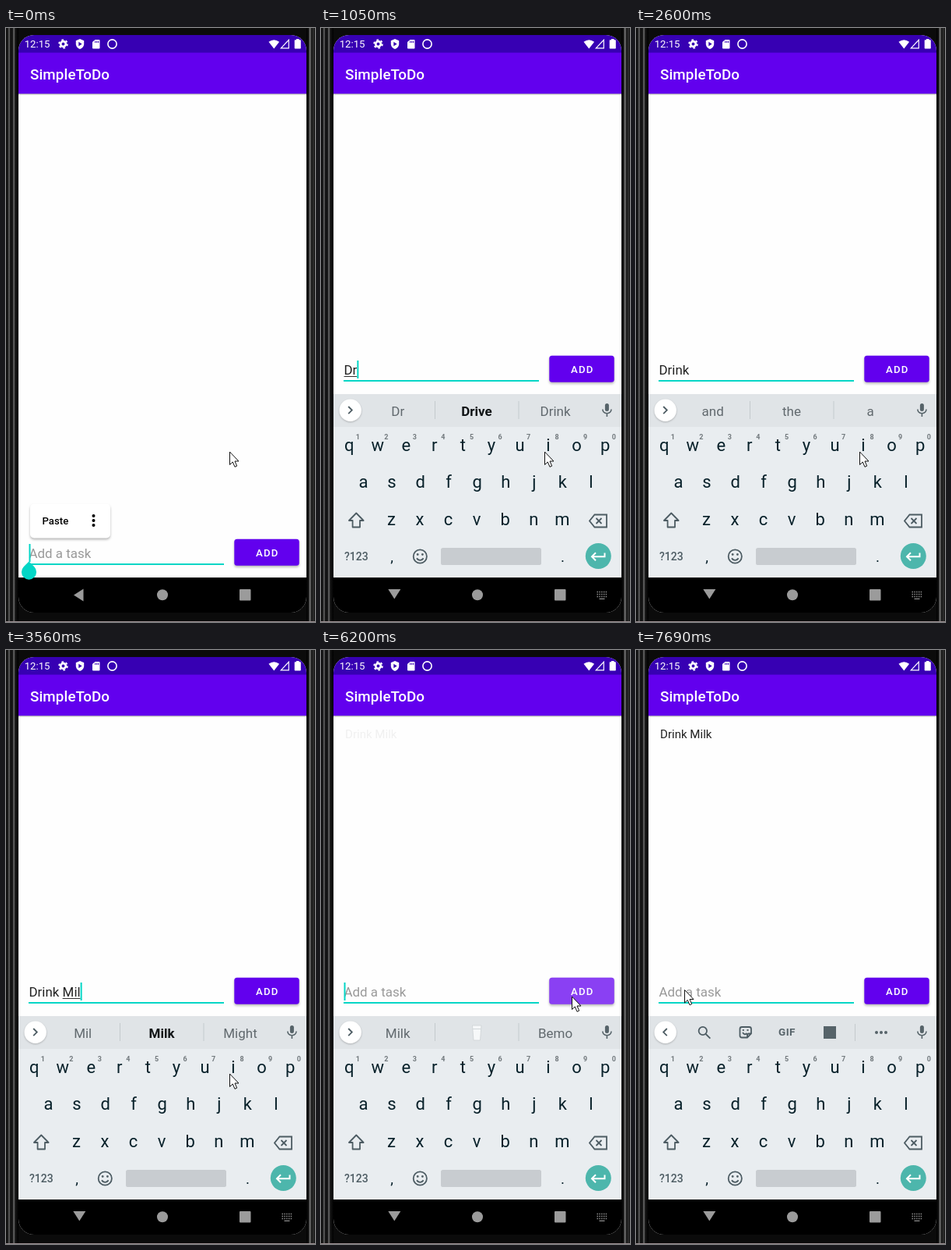
Write an HTML page that moves like this. It is 397 px wide and 761 px high and loops after 8 s.

```html
<!DOCTYPE html>
<html lang="en">
<head>
<meta charset="utf-8">
<title>To-do app</title>
<style>
html, body { margin: 0; width: 100%; height: 100%; overflow: hidden; background: #0b0b0b; }
svg { display: block; width: 397px; height: 761px; font-family: Roboto, sans-serif; }
text { white-space: pre; }
.mid { text-anchor: middle; }
.med { font-weight: 500; }
.line { fill: none; stroke: #4d5c63; stroke-width: 1.8; }
.icon { fill: #566369; }
.key { font-size: 22px; fill: #08212a; }
.num { font-size: 9px; font-weight: 700; fill: #72797d; }
.word { font-size: 17px; fill: #61696e; }
.word.bold { font-weight: 700; fill: #101416; }
.nav { fill: #9b9b9b; }
.low { filter: drop-shadow(0 1px 1px rgba(0,0,0,.22)); }
.lift { filter: drop-shadow(0 2px 1.5px rgba(0,0,0,.28)); }
</style>
</head>
<body>
<svg viewBox="0 0 397 761">
  <defs>
    <linearGradient id="left">
      <stop offset="0" stop-color="#0c0c0c"/><stop offset=".16" stop-color="#1c1c1c"/>
      <stop offset=".25" stop-color="#707070"/><stop offset=".34" stop-color="#181818"/>
      <stop offset=".52" stop-color="#101010"/><stop offset=".63" stop-color="#707070"/>
      <stop offset=".74" stop-color="#151515"/><stop offset="1" stop-color="#000"/>
    </linearGradient>
    <linearGradient id="right">
      <stop offset="0" stop-color="#000"/><stop offset=".25" stop-color="#101010"/>
      <stop offset=".42" stop-color="#787878"/><stop offset=".6" stop-color="#181818"/>
      <stop offset=".85" stop-color="#303030"/><stop offset="1" stop-color="#0a0a0a"/>
    </linearGradient>
    <linearGradient id="shade" x2="0" y2="1">
      <stop offset="0" stop-color="#000" stop-opacity=".28"/><stop offset="1" stop-color="#000" stop-opacity="0"/>
    </linearGradient>
    <clipPath id="screen"><rect x="16" y="9" width="370" height="740" rx="20"/></clipPath>
  </defs>

  <rect width="397" height="761" fill="#0b0b0b"/>
  <rect width="16" height="761" fill="url(#left)"/>
  <rect x="386" width="11" height="761" fill="url(#right)"/>
  <rect y="760" width="397" height="1" fill="#9a8d90"/>

  <g clip-path="url(#screen)">
    <rect x="16" y="9" width="370" height="740" fill="#fefefe"/>
    <rect x="16" y="9" width="370" height="23" fill="#3700b3"/>
    <rect x="16" y="31.600" width="370" height="52.600" fill="#6200ee"/>
    <rect x="16" y="84" width="370" height="2.500" fill="url(#shade)"/>
    <rect x="16" y="704" width="370" height="45"/>

    <g fill="#fff">
      <text x="23.700" y="25.300" font-size="13.200">12:15</text>
      <circle cx="73.500" cy="20.500" r="3.300" fill="none" stroke="#fff" stroke-width="2.700"/>
      <circle cx="73.500" cy="20.500" r="5.400" fill="none" stroke="#fff" stroke-width="1.800" stroke-dasharray="2.600 3.050"/>
      <path d="M95 14l5.200 2.300v4c0 3-2.200 5.800-5.200 6.800-3-1-5.200-3.800-5.200-6.800v-4z"/>
      <path d="M93.300 17.800l4.400 2.700-4.400 2.700z" fill="#3700b3"/>
      <path d="M114.500 15h5q1 0 1 1v9.500q0 1-1 1h-7.500q-1 0-1-1V18z"/>
      <path d="M114.700 16.500v2.500M116.700 16.500v2.500M118.700 16.500v2.500" stroke="#3700b3"/>
      <circle cx="136.500" cy="20.500" r="5.600" fill="none" stroke="#fff" stroke-width="1.600"/>
      <path d="M344.300 26.500L337.500 17.800q6.800-5.200 13.600 0z"/>
      <path d="M363.300 15.300v10.500h-10z" fill="none" stroke="#fff" stroke-width="1.200"/>
      <path d="M373 15.200V14h3.500v1.200h1.500q.8 0 .8.800v9.700q0 .8-.8.800h-6.500q-.8 0-.8-.8V16q0-.8.800-.8z"/>
      <text class="med" x="31" y="66" font-size="18.840" letter-spacing=".08">SimpleToDo</text>
    </g>

    <text id="item" x="31" y="113" font-size="15.070" fill="#222">Drink Milk</text>

    <g id="form">
      <text id="field" x="29.500" y="679" font-size="16.960"></text>
      <rect id="mark" y="681" height="1" fill="#333"/>
      <rect x="29" y="686" width="251" height="2" fill="#03d6c6"/>
      <rect id="caret" y="661" width="2" height="23" fill="#03d6c6"/>
      <rect class="lift" x="293.300" y="654.700" width="83.400" height="34" rx="3.500" fill="#6200ee"/>
      <rect id="ripple" x="293.300" y="654.700" width="83.400" height="34" rx="3.500" fill="#fff"/>
      <text class="med" x="321" y="676.800" font-size="13.190" letter-spacing="1.180" fill="#fff">ADD</text>
    </g>

    <path id="back" class="nav" d="M87 726.500L99.500 718.500V734.500z"/>
    <circle class="nav" cx="201" cy="726.300" r="7"/>
    <rect class="nav" x="300" y="719" width="14.500" height="14.500" rx="1"/>
    <g id="switch" fill="none" stroke="#8d8d8d">
      <path d="M354.500 722.500h13M354.500 725.500h13M354.500 728.500h13" stroke-width="1.300" stroke-dasharray="1.500 1.300"/>
      <path d="M357.500 731.300h7" stroke-width="1.200"/>
    </g>

    <g id="board">
      <rect x="16" y="469" width="370" height="235" fill="#e9edf0"/>
      <rect x="16" y="469" width="370" height="42" fill="#e0e4e7"/>
      <circle class="low" cx="37.700" cy="489.700" r="14.200" fill="#fff"/>
      <path id="chevron" class="line" d="M35.200 485l4.600 4.600-4.600 4.600"/>
      <g class="icon">
        <rect x="364.900" y="481" width="5" height="10" rx="2.500"/>
        <path d="M361.800 488.500q.4 5 5.600 5.200 5.200-.2 5.600-5.200M367.400 493.500v4.500" fill="none" stroke="#566369" stroke-width="1.600"/>
      </g>
      <g id="words">
        <path d="M146.500 478v23M254 478v23" stroke="#c4cacd"/>
        <text class="word mid" x="98.700" y="496.500"></text>
        <text class="word mid" x="200" y="496.500"></text>
        <text class="word mid" x="301" y="496.500"></text>
        <g id="cup">
          <path d="M194.500 481h11.500l-1.500 19h-8.500z" fill="#f6f8f9" stroke="#cdd2d5" stroke-width=".8"/>
          <path d="M195 485.500h10.500" stroke="#d2d7da"/>
        </g>
      </g>
      <g id="tools">
        <circle class="line" cx="85.800" cy="488" r="5.200"/>
        <path class="line" d="M89.600 492l5.800 5.700"/>
        <path class="line" d="M136 483h9.500q2.500 0 2.500 2.500v6l-5 5h-7q-2.500 0-2.500-2.500v-8.500q0-2.500 2.500-2.500zM148 491.500h-3q-2 0-2 2v3M137 490q2.500 4 5.500 1" stroke-width="1.600"/>
        <path class="icon" d="M136.800 486h2v2h-2zM142.500 486h2v2h-2z"/>
        <text class="mid icon" x="194" y="494.200" font-size="13.500" font-weight="700" letter-spacing=".5">GIF</text>
        <rect class="icon" x="241" y="482" width="16" height="16"/>
        <path d="M281.500 479v22" stroke="#c4cacd"/>
        <g class="icon"><circle cx="309" cy="490" r="2"/><circle cx="315" cy="490" r="2"/><circle cx="321" cy="490" r="2"/></g>
      </g>
      <g id="keys"></g>
      <path class="line" d="M45.300 621.500l9.300 9.500h-4.600v8.500h-9.400V631H36z" stroke-linejoin="round"/>
      <path class="line" d="M351.500 623.500h15.500v16h-15.500l-6.500-8zM353.500 628l7 7M360.500 628l-7 7"/>
      <text class="med mid" x="45.300" y="682" font-size="14" fill="#4d5c63">?123</text>
      <text class="key mid" x="91" y="684" style="font-size:19px">,</text>
      <text class="key mid" x="310.500" y="684" style="font-size:19px">.</text>
      <circle class="line" cx="127.300" cy="677" r="8.600"/>
      <g class="icon"><circle cx="124.200" cy="674.500" r="1.400"/><circle cx="130.400" cy="674.500" r="1.400"/></g>
      <path class="line" d="M123 679.300q1.500 2.600 4.300 2.600t4.300-2.600"/>
      <rect x="154" y="666" width="129" height="22" rx="2.500" fill="#c8ccd0"/>
      <circle cx="356.300" cy="676.500" r="16.500" fill="#4db6ac"/>
      <path d="M364.500 672.500v4.700h-15.500M353 672.200l-5 5 5 5" fill="none" stroke="#fff" stroke-width="2"/>
    </g>

    <path id="handle" d="M29.500 683.500L36.300 690.300A9.600 9.600 0 1 1 22.700 690.300z" fill="#03d6c6"/>
    <g id="popup">
      <rect class="lift" x="31" y="609.500" width="103" height="44" rx="5" fill="#fff"/>
      <text class="med" x="46.500" y="636" font-size="13.190">Paste</text>
      <circle cx="112.500" cy="625" r="2"/><circle cx="112.500" cy="631" r="2"/><circle cx="112.500" cy="637" r="2"/>
    </g>
  </g>

  <path id="mouse" d="M0 0V16.500L3.800 13 6.500 19.300 9.200 18.100 6.500 12H11.500z" fill="#fff" stroke="#111"/>
</svg>

<script>
const $ = id => document.getElementById(id);
const LOOP = 8000, TEXT_X = 29.5;
const pen = document.createElement('canvas').getContext('2d');
const slots = [...document.querySelectorAll('.word')];

// Keyboard letters and digits
const label = (s, x, y, cls) => `<text class="${cls} mid" x="${x}" y="${y}">${s}</text>`;
const row = (s, x, y, cls = 'key') => [...s].map((c, i) => label(c, x + i * 36.55, y, cls)).join('');
$('keys').innerHTML = row('qwertyuiop', 36.2, 542) + row('1234567890', 47.3, 526.5, 'num') +
  row('asdfghjkl', 54.5, 589) + row('zxcvbnm', 90.5, 637);

// Each step overrides part of the state; "*" marks the bold word, "#" the cup
const steps = [
  [0, { text: '', mark: 0, caret: 1, open: 0, slide: 0, fade: 0, turn: 0, popup: 1, handle: 1, item: 0,
        ripple: 0, tools: 0, words: 'D,*Do,Did', mouse: [287.5, 543] }],
  [250, { caret: 0 }],
  [680, { text: 'D', mark: 1, caret: 1, open: 1, slide: 30, fade: .35, turn: -18 }],
  [810, { slide: 15.5, fade: .79, turn: -48, handle: .8 }],
  [930, { slide: 4, fade: .96, turn: -80, popup: .3, handle: .3 }],
  [1050, { slide: 0, fade: 1, turn: -90, popup: 0, handle: 0, text: 'Dr', words: 'Dr,*Drive,Drink' }],
  [1420, { text: 'Dri', words: 'Dri,*Drive,Drink' }],
  [1670, { text: 'Drin', words: 'Drin,*Drink,Drinking' }],
  [1920, { text: 'Drink', words: 'Drink,Drinking,Drinks' }],
  [2170, { text: 'Drink ', mark: 0, words: 'and,the,a' }],
  [2600, { caret: 0 }],
  [3130, { text: 'Drink M', mark: 1, caret: 1, words: 'M,My,Me' }],
  [3280, { text: 'Drink Mi', words: 'Mi,*Milk,Might' }],
  [3560, { text: 'Drink Mil', words: 'Mil,*Milk,Might' }],
  [3710, { text: 'Drink Milk', words: 'Milk,#,Bemo' }],
  [4110, { caret: 0 }],
  [4650, { caret: 1 }],
  [5150, { caret: 0, mouse: [319.5, 490.5] }],
  [5280, { mouse: [350, 420] }],
  [5400, { mouse: [362, 351] }],
  [5540, { mouse: [357, 420] }],
  [5660, { caret: 1, mouse: [346.5, 456] }],
  [5810, { mouse: [346.5, 440] }],
  [5960, { mouse: [330, 442] }],
  [6080, { mouse: [322.5, 444], ripple: .14 }],
  [6200, { text: '', mark: 0, item: .06, ripple: .25 }],
  [6350, { item: .45, ripple: .17, tools: 1, mouse: [318, 449] }],
  [6470, { item: .8, ripple: .07, mouse: [292, 468] }],
  [6590, { item: 1, ripple: 0, mouse: [232, 478] }],
  [6740, { caret: 0, mouse: [120, 474] }],
  [6860, { mouse: [56, 452] }],
  [7010, { mouse: [52, 447] }],
  [7130, { mouse: [54, 443] }],
  [7260, { caret: 1, mouse: [56, 441] }],
  [7690, { caret: 0, mouse: [62.5, 435.5] }]
];

const states = [];
steps.reduce((s, [, change]) => {
  const next = { ...s, ...change };
  states.push(next);
  return next;
}, {});

const set = (id, name, value) => $(id).setAttribute(name, value);
const show = (id, on) => set(id, 'opacity', +on);

function width(s) {
  pen.font = '16.96px Roboto, sans-serif';
  return pen.measureText(s).width;
}

function drawField(s) {
  const end = TEXT_X + width(s.text);
  const start = TEXT_X + width(s.text.slice(0, s.text.lastIndexOf(' ') + 1));
  $('field').textContent = s.text || 'Add a task';
  set('field', 'fill', s.text ? '#222' : '#999');
  set('mark', 'x', start);
  set('mark', 'width', s.mark ? end - start : 0);
  set('caret', 'x', end);
  show('caret', s.caret);
  set('form', 'transform', `translate(0 ${s.open ? -235 : 0})`);
}

function drawWords(s) {
  s.words.split(',').forEach((word, i) => {
    slots[i].textContent = word.replace(/[*#]/, '');
    slots[i].classList.toggle('bold', word[0] === '*');
  });
  show('cup', s.words.includes('#'));
  show('words', !s.tools);
  show('tools', s.tools);
  set('chevron', 'transform', s.tools ? 'translate(75 0) scale(-1 1)' : '');
}

function draw(s) {
  drawField(s);
  drawWords(s);
  set('board', 'transform', `translate(0 ${s.slide})`);
  show('board', s.fade);
  show('switch', s.fade);
  set('back', 'transform', `rotate(${s.turn} 93.15 725.35)`);
  for (const id of ['popup', 'handle', 'item', 'ripple']) show(id, s[id]);
  set('mouse', 'transform', `translate(${s.mouse})`);
}

const begin = performance.now();
let last = -1;
function tick() {
  const t = (performance.now() - begin) % LOOP;
  const i = steps.findLastIndex(([at]) => at <= t);
  if (i !== last) draw(states[last = i]);
  requestAnimationFrame(tick);
}
tick();
</script>
</body>
</html>
```
